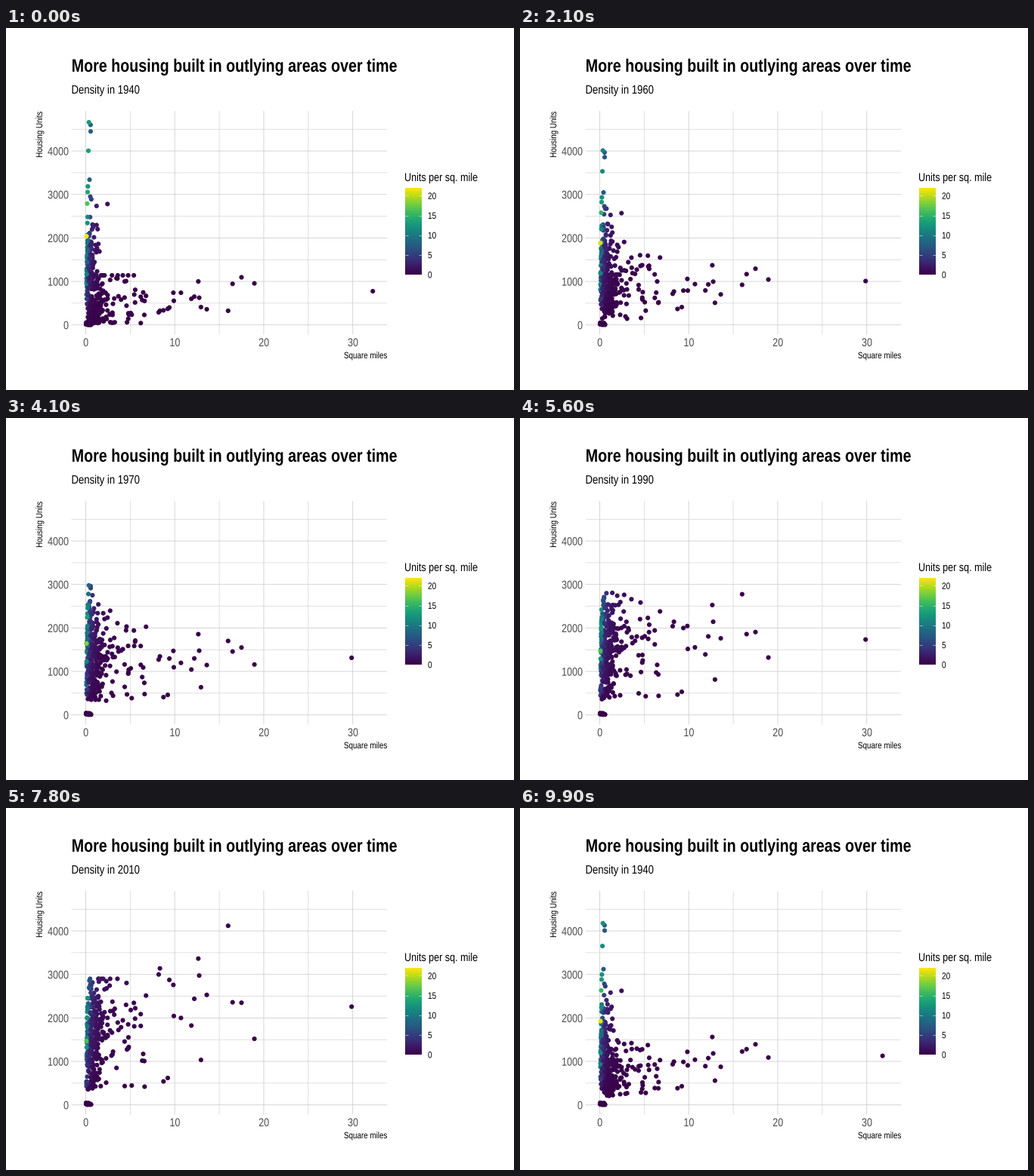
A matplotlib script for the animation above (10000 ms loop, 672x480 px).

```python
import numpy as np
import matplotlib.pyplot as plt
from matplotlib.animation import FuncAnimation
from matplotlib.patches import PathPatch
from matplotlib.textpath import TextPath
from matplotlib.transforms import Affine2D

W, H, DPI = 672, 480, 96
FRAMES, STEP_MS = 100, 100
YEARS = [*range(1940, 2011, 10), 2019]
N = len(YEARS)
DECADE = np.arange(N)
MAX_DENSITY = 22
NARROW = 0.82  # one condensed face for all lettering
GREY = "#4d4d4d"

# Crowded small tracts: area, units in 1940
CROWDED = [(2.45, 2780), (1.22, 2735), (0.63, 2890), (0.52, 2950),
           (0.56, 4450), (0.55, 4600), (0.36, 4660), (0.31, 4005),
           (0.43, 3340), (0.25, 3185), (0.22, 3055), (0.17, 2790),
           (0.09, 2040)]
# Large outlying tracts: area, units in 1940, units in 2010
OUTLYING = [(29.87, 775, 2260), (18.95, 955, 1520), (17.5, 1095, 2350),
            (16.5, 945, 2360), (16.0, 325, 4120), (13.6, 360, 2530),
            (12.95, 410, 1035), (12.75, 625, 2975), (12.65, 1000, 3365),
            (12.2, 650, 2440), (11.87, 600, 1825), (10.7, 740, 2000),
            (9.85, 740, 2760), (9.9, 555, 2045), (9.4, 400, 2875),
            (9.22, 370, 620), (8.74, 335, 540), (8.2, 290, 3000),
            (8.34, 325, 3140)]


def tracts(area, early, late, growth):
    """Area and units of each tract (rows) in each year (columns)."""
    early, late = early[:, None], late[:, None]
    return np.repeat(area[:, None], N, axis=1), early + (late - early) * growth


def empty_tracts(n=14):
    rng = np.random.default_rng(5)
    area = rng.uniform(0.02, 0.6, n)
    return tracts(area, rng.exponential(25, n), rng.exponential(25, n), DECADE / 8)


def typical_tracts(n=320, fringe=18):
    """City tracts start full, outlying ones fill up at their own pace."""
    rng = np.random.default_rng(12)
    area = rng.lognormal(np.log(0.7), 0.9, n) % 4.9
    area = np.append(area, rng.uniform(4, 7, fringe))
    n += fringe
    core = rng.random(n) < np.exp(-(area / 0.95) ** 2)
    city = rng.normal(1300, 500, n)
    edge = 40 + np.minimum(rng.exponential(320 + 60 * area, n), 1100)
    early = np.where(core, np.clip(city, 380, 2600), edge)
    late = np.where(core, early + rng.normal(50, 350, n), rng.normal(1700, 650, n))
    late = np.clip(late, 350 + 200 * rng.random(n), 2900)
    area = np.maximum(area, np.maximum(early, late) / 12000)
    pace = rng.lognormal(0.1, 0.5, (n, 1))
    return tracts(area, early, late, np.sin(np.pi / 14 * DECADE) ** pace)


def outlying_tracts():
    area, units = tracts(*np.array(OUTLYING).T, (DECADE / 7) ** 1.3)
    area[0, 0] = 32.25  # the largest tract was redrawn after 1940
    return area, units


def crowded_tracts():
    area, peak = np.array(CROWDED).T
    t = np.clip(DECADE / 5, 0, 1)
    return tracts(area, peak, np.minimum(2250, 0.72 * peak), t * t * (3 - 2 * t))


groups = [empty_tracts(), typical_tracts(), outlying_tracts(), crowded_tracts()]
area, units = (np.vstack(g) for g in zip(*groups))
# The first state is repeated at the end to close the loop
area, units = (np.hstack([a, a[:, :1]]) for a in (area, units))

# Each state rests, then moves on evenly
keys, states, at = [], [], 5
for i in range(N):
    steps = 6 if i < 2 else 5
    keys += [at, at + steps]
    states += [i, i + 1]
    at += steps + 6


def px(x):
    return 105.4 + 11.777 * np.asarray(x)


def py(y):
    return 393.7 - 0.05766 * np.asarray(y)


def shade(density):
    """Viridis, slightly deepened."""
    rgba = plt.cm.viridis(np.clip(density / MAX_DENSITY, 0, 1))
    return rgba ** 1.15


fig = plt.figure(figsize=(W / DPI, H / DPI), dpi=DPI, facecolor="white")
ax = fig.add_axes([0, 0, 1, 1])
ax.axis("off")


def lettering(s, x, y, size, align=0, bold=False, turn=0):
    """Outline of s in stage pixels; align 0 left, 0.5 centre, 1 right."""
    prop = {"family": "Liberation Sans", "weight": "bold" if bold else "normal"}
    path = TextPath((0, 0), s, size=size, prop=prop)
    shift = -align * path.get_extents().x1
    place = Affine2D().translate(shift, 0).scale(NARROW, -1)
    return place.rotate_deg(turn).translate(x, y).transform_path(path)


def write(*args, color="black", **kw):
    patch = PathPatch(lettering(*args, **kw), fc=color, lw=0, zorder=5)
    return ax.add_patch(patch)


def grid(xs, ys, width):
    style = dict(colors="#cccccc", linewidths=width * 72 / DPI, zorder=1,
                 snap=False)
    ax.vlines(px(xs), 110, 406.5, **style)
    ax.hlines(py(ys), 86.5, 504, **style)


grid([5, 15, 25], range(500, 5000, 1000), 0.6)
grid([0, 10, 20, 30], range(0, 5000, 1000), 0.8)
for v in range(0, 5000, 1000):
    write(str(v), 82.5, py(v) + 5.6, 15.33, align=1, color=GREY)
for v in range(0, 40, 10):
    write(str(v), px(v), 422, 15.33, align=0.5, color=GREY)

write("More housing built in outlying areas over time", 86.7, 58, 24, bold=True)
write("Square miles", 504, 438, 12, align=1)
write("Housing Units", 48, 111, 12, align=1, turn=-90)

write("Units per sq. mile", 527, 203, 15.33)
ramp = shade(np.linspace(MAX_DENSITY, 0, 230))[:, None]
ax.imshow(ramp, extent=(528, 550, 327, 212), aspect="auto", zorder=2)
for v in range(0, MAX_DENSITY, 5):
    y = 327 - v * 5.23
    ax.hlines([y, y], [528, 546], [532, 550], colors="white",
              linewidths=0.4, zorder=3)
    write(str(v), 558, y + 4.4, 12.27)

captions = [lettering(f"Density in {y}", 86.5, 87, 16) for y in YEARS]
caption = ax.add_patch(PathPatch(captions[0], fc="black", lw=0, zorder=5))
dots = ax.scatter(px(area[:, 0]), py(units[:, 0]), s=21.3, lw=0, zorder=4)
ax.set_xlim(0, W)
ax.set_ylim(H, 0)


def draw(frame):
    state = np.interp(frame, keys, states)
    i = min(int(state), N - 1)
    t = state - i
    x, y = ((1 - t) * a[:, i] + t * a[:, i + 1] for a in (area, units))
    dots.set_offsets(np.column_stack([px(x), py(y)]))
    dots.set_facecolor(shade(y / x / 1000))
    caption.set_path(captions[int(state + 0.5) % N])
    return dots, caption


anim = FuncAnimation(fig, draw, frames=FRAMES, interval=STEP_MS,
                     repeat=True, repeat_delay=0, blit=False)
plt.show()
```
